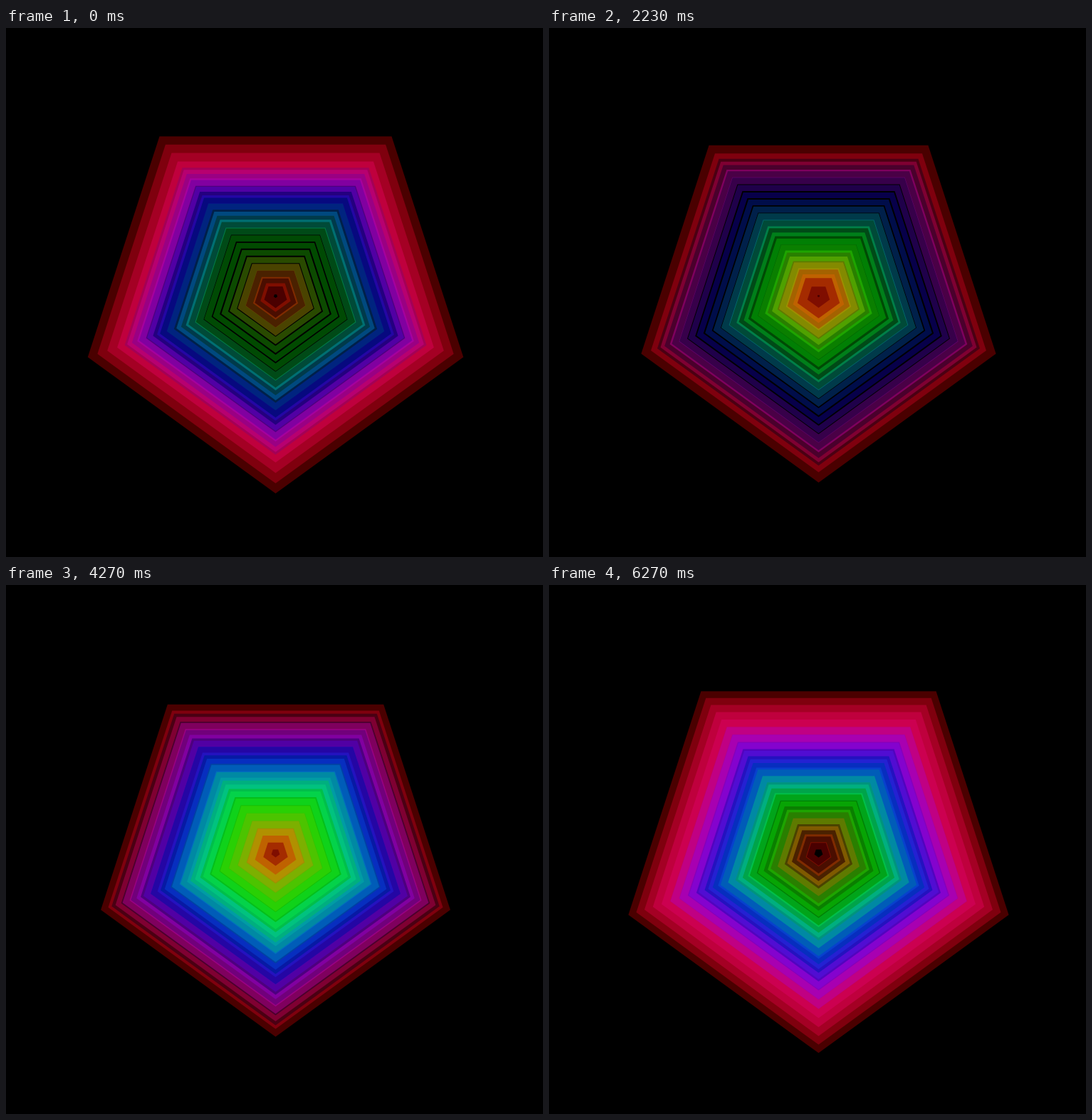
An HTML page with a canvas that plays this animation: 754 px wide and 743 px high, repeating every 6.37 s.

```html
<!DOCTYPE html>
<html lang="en">
<head>
<meta charset="utf-8">
<title>Pulsing pentagons</title>
<style>
  html, body { margin: 0; width: 100%; height: 100%; overflow: hidden; background: #000; }
  canvas { display: block; }
</style>
</head>
<body>
<canvas id="stage" width="754" height="743"></canvas>
<script>
const ctx = document.getElementById('stage').getContext('2d');
const LOOP = 6370, LAST_STEP = 52;
const RINGS = 20, SPACING = 12.5, ALPHA = 0.29;
const CENTER = { x: 378.5, y: 376.5 };
const RAD = Math.PI / 180;

// The motion advances in even steps, a little slower at the end of the loop
const STEP_MS = 118.6, SLOW_STEP_MS = 135, SLOW_FROM = 5460;

function stepAt(ms) {
  const even = Math.min(ms, SLOW_FROM) / STEP_MS;
  const slow = Math.max(0, ms - SLOW_FROM) / SLOW_STEP_MS;
  return Math.min(LAST_STEP, Math.floor(even + slow + 0.33));
}

// Rainbow hue that lingers around green and, more weakly, around red
function ringHue(part) {
  const hue = 360 * part;
  const pull = 8 * (1 + Math.cos((hue - 100) * RAD));
  return hue - pull * Math.sin(3 * hue * RAD);
}

function pentagon(radius) {
  ctx.beginPath();
  for (let k = 0; k < 5; k++) {
    const angle = (90 + 72 * k) * RAD;
    ctx.lineTo(CENTER.x + radius * Math.cos(angle), CENTER.y + radius * Math.sin(angle));
  }
  ctx.closePath();
}

function draw(step) {
  ctx.fillStyle = '#000';
  ctx.fillRect(0, 0, 754, 743);
  for (let ring = 1; ring <= RINGS; ring++) {
    const part = (ring - 1) / (RINGS - 1);
    const phase = 15.3 * step - 50 - 180 * (1 - part);
    ctx.lineWidth = 30 + 22 * Math.cos(phase * RAD);
    ctx.strokeStyle = `hsla(${ringHue(part)}, 100%, 50%, ${ALPHA})`;
    pentagon(SPACING * ring);
    ctx.stroke();
  }
}

function tick() {
  draw(stepAt(performance.now() % LOOP));
  requestAnimationFrame(tick);
}
tick();
</script>
</body>
</html>
```
